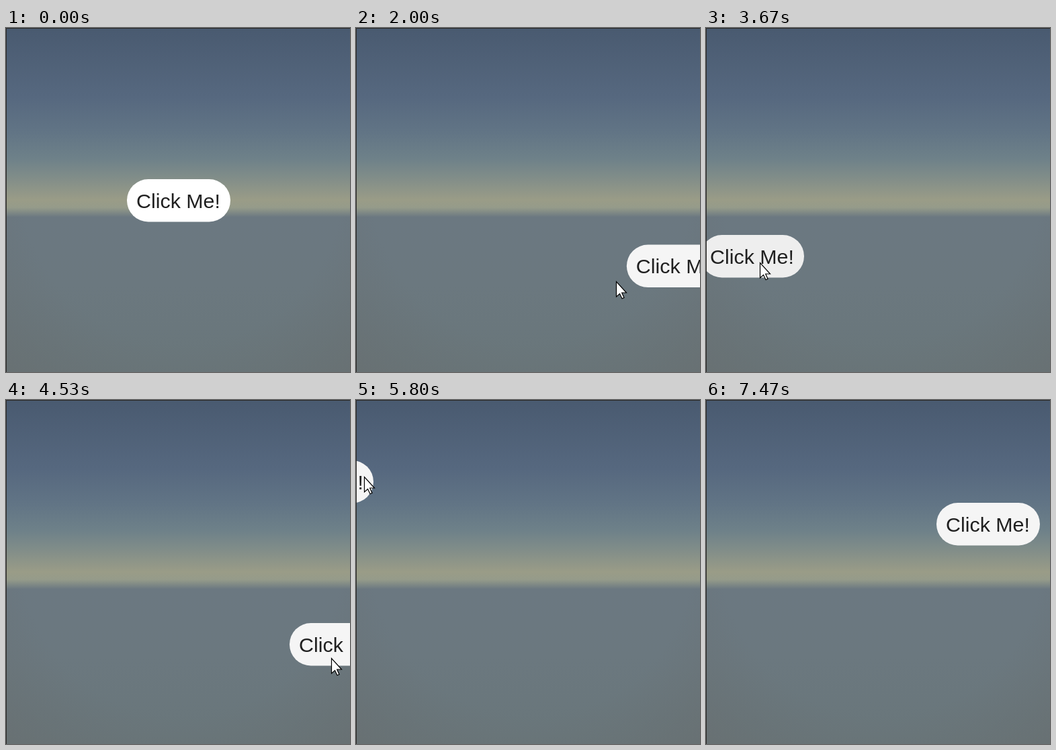
These frames come from a looping animation (512 px wide and 512 px high, 8000 ms). An HTML page:

```html
<!DOCTYPE html>
<html lang="en">
<head>
<meta charset="utf-8">
<title>Runaway button</title>
<style>
  html, body { margin: 0; width: 100%; height: 100%; overflow: hidden; background: #2a2826; }
  svg { display: block; width: 100vw; height: 100vh; }
  text { font: 30.4px "Liberation Sans", Arial, sans-serif; text-anchor: middle; fill: #202020; }
</style>
</head>
<body>
<svg viewBox="0 0 512 512">
  <defs>
    <linearGradient id="sky" gradientUnits="userSpaceOnUse" x1="0" y1="0" x2="0" y2="512">
      <stop offset="0" stop-color="#495a70"/>
      <stop offset=".2" stop-color="#56687f"/>
      <stop offset=".3" stop-color="#617485"/>
      <stop offset=".38" stop-color="#6e8189"/>
      <stop offset=".43" stop-color="#7f8c89"/>
      <stop offset=".5" stop-color="#9a9c87"/>
      <stop offset=".522" stop-color="#959b8a"/>
      <stop offset=".55" stop-color="#6b7881"/>
      <stop offset=".75" stop-color="#6b787f"/>
      <stop offset="1" stop-color="#69767a"/>
    </linearGradient>
    <radialGradient id="ground" gradientUnits="userSpaceOnUse" cx="262" cy="230" r="400">
      <stop offset=".6" stop-color="#676c6d" stop-opacity="0"/>
      <stop offset="1" stop-color="#676c6d" stop-opacity=".6"/>
    </radialGradient>
    <clipPath id="view"><rect x="1" y="1" width="511" height="511"/></clipPath>
  </defs>
  <rect width="512" height="512" fill="#2a2826"/>
  <g clip-path="url(#view)">
    <rect width="512" height="512" fill="url(#sky)"/>
    <rect y="280" width="512" height="232" fill="url(#ground)"/>
    <g id="button">
      <rect id="pill" width="154" height="63.5" rx="31.75"/>
      <text x="76.5" y="42.5">Click Me!</text>
    </g>
    <path id="cursor" d="M.5 .5V23L5.5 18.5 9 25.8 12 24.4 8.7 17H15.5Z"
      fill="#fff" stroke="#000" stroke-width="1.2"/>
  </g>
</svg>
<script>
const LOOP = 8000, FPS = 15, SLIDE = 500, FADE = 100, HOLD = 118;
const NORMAL = 255, ACTIVE = 245, PRESSED = 200;
const $ = id => document.getElementById(id);
const mix = (a, b, k) => a + (b - a) * k;
const mixPoint = (p, q, k) => p.map((v, i) => mix(v, q[i], k));
const ramp = (t, from, length) => Math.min(1, Math.max(0, (t - from) / length));
const smooth = u => u * u * (3 - 2 * u);

// Each click sends the button gliding to a new place
const home = [180, 225];
const slides = [
  { at: 1563, to: [413, 327] },
  { at: 2805, to: [-8, 308] },
  { at: 3770, to: [422, 332] },
  { at: 4765, to: [-128, 90] },
  { at: 6010, to: [343, 153] }
];

// The pointer sweeps along one bent stroke per chase
const entry = [500, 500];
const strokes = [
  { from: 640, until: 1390, via: [379, 387], to: [258, 274] },
  { from: 1603, until: 2575, via: [479, 469], to: [460, 372] },
  { from: 2845, until: 3600, via: [270, 365], to: [80, 349] },
  { from: 3810, until: 4530, via: [310, 210], to: [484, 384] },
  { from: 4805, until: 5780, via: [104, 432], to: [12, 114] },
  { from: 6050, until: 6760, via: [509, 388], to: [438, 208] },
  { from: 6780, until: 7480, via: [400, 370], to: [226, 530] }
];

function buttonAt(t) {
  let pos = home, shade = mix(NORMAL, ACTIVE, ramp(t, 1360, FADE));
  for (const { at, to } of slides) {
    if (t < at - HOLD) break;
    const held = mix(ACTIVE, PRESSED, ramp(Math.min(t, at), at - HOLD, FADE));
    shade = mix(held, ACTIVE, ramp(t, at, FADE));
    pos = mixPoint(pos, to, smooth(ramp(t, at, SLIDE)));
  }
  return { pos, shade: Math.round(shade) };
}

function pointerAt(t) {
  let tip = entry;
  for (const { from, until, via, to } of strokes) {
    if (t < from) break;
    const k = smooth(ramp(t, from, until - from));
    tip = mixPoint(mixPoint(tip, via, k), mixPoint(via, to, k), k);
  }
  return tip.map(Math.round);
}

function draw(t) {
  const { pos, shade } = buttonAt(t);
  $('button').setAttribute('transform', `translate(${pos})`);
  $('pill').setAttribute('fill', `rgb(${shade},${shade},${shade})`);
  $('cursor').setAttribute('transform', `translate(${pointerAt(t)})`);
  $('cursor').setAttribute('visibility', t > 660 && t < 7460 ? 'visible' : 'hidden');
}

const begin = performance.now();
function tick() {
  const t = (performance.now() - begin) % LOOP;
  const step = Math.floor(t * FPS / 1000 + .06) % (LOOP * FPS / 1000);
  draw(step * 1000 / FPS);
  requestAnimationFrame(tick);
}
tick();
</script>
</body>
</html>
```
